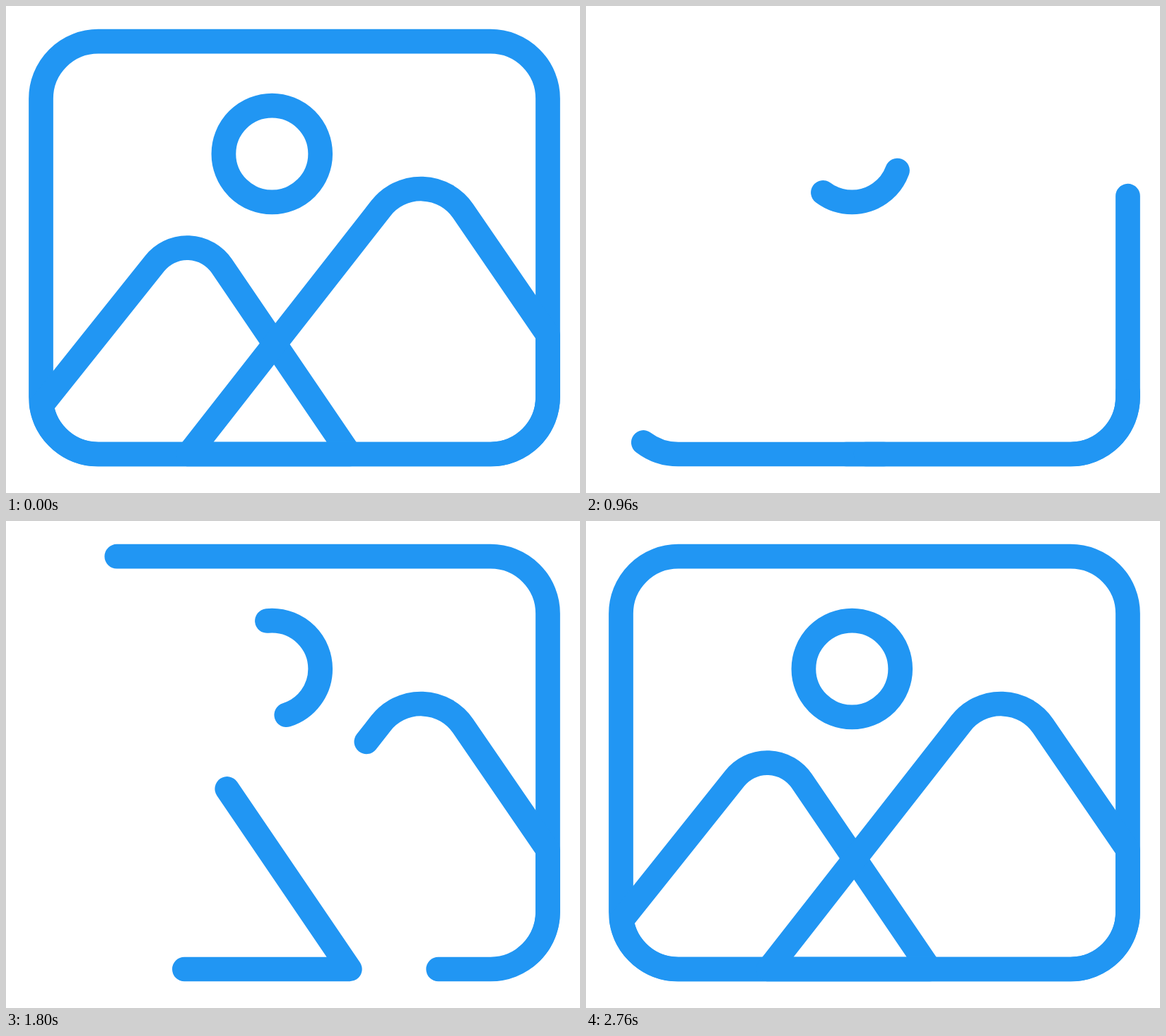
Recreate the animation shown at these times as an HTML page. Size 812 by 690 pixels, loop 2800 ms.

```html
<!DOCTYPE html>
<html lang="en">
<head>
<meta charset="utf-8">
<title>Picture icon</title>
<style>
  html, body { margin: 0; width: 100%; height: 100%; overflow: hidden; background: #fff; }
  svg { display: block; width: 812px; height: 690px; }
  path {
    fill: none;
    stroke: #2196f3;
    stroke-width: 34.7;
    stroke-linecap: round;
    stroke-linejoin: round;
  }
</style>
</head>
<body>
<svg viewBox="0 0 812 690">
  <!-- each outline starts at the point where it shrinks to a dot -->
  <path pathLength="1" d="M49.5 554V131.2A81 81 0 0 1 130.5 50.2H685.5A81 81 0 0 1 766.5 131.2V554A81 81 0 0 1 685.5 635H130.5A81 81 0 0 1 49.5 554Z"/>
  <path pathLength="1" d="M307.9 209.5A68.4 68.4 0 0 1 444.7 209.5A68.4 68.4 0 0 1 307.9 209.5Z"/>
  <path pathLength="1" d="M118.2 480.4L210.4 364.7A59 59 0 0 1 305.2 368.3L486.3 635H130.5A81 81 0 0 1 50.2 565.6Z"/>
  <path pathLength="1" d="M303.6 576.7L530.4 286.5A72 72 0 0 1 646.4 290.3L766.5 465.6V554A81 81 0 0 1 685.5 635H258Z"/>
</svg>
<script>
  const LOOP = 2800, DOT = 1286.6, SWEEP = 1100;

  // time, visible share of the outline, where the visible part begins
  const steps = [
    [0, 1, -1.5],
    [DOT - SWEEP, 1, -1.5],
    [DOT, 0, 0],
    [DOT + SWEEP, 1, 0.5],
    [LOOP, 1, 0.5],
  ];

  const frames = steps.map(([time, len, start]) => ({
    offset: time / LOOP,
    strokeDasharray: `${len}px ${1 - len}px`,
    strokeDashoffset: `${-start}px`,
  }));

  for (const path of document.querySelectorAll('path')) {
    path.animate(frames, { duration: LOOP, iterations: Infinity });
  }
</script>
</body>
</html>
```
